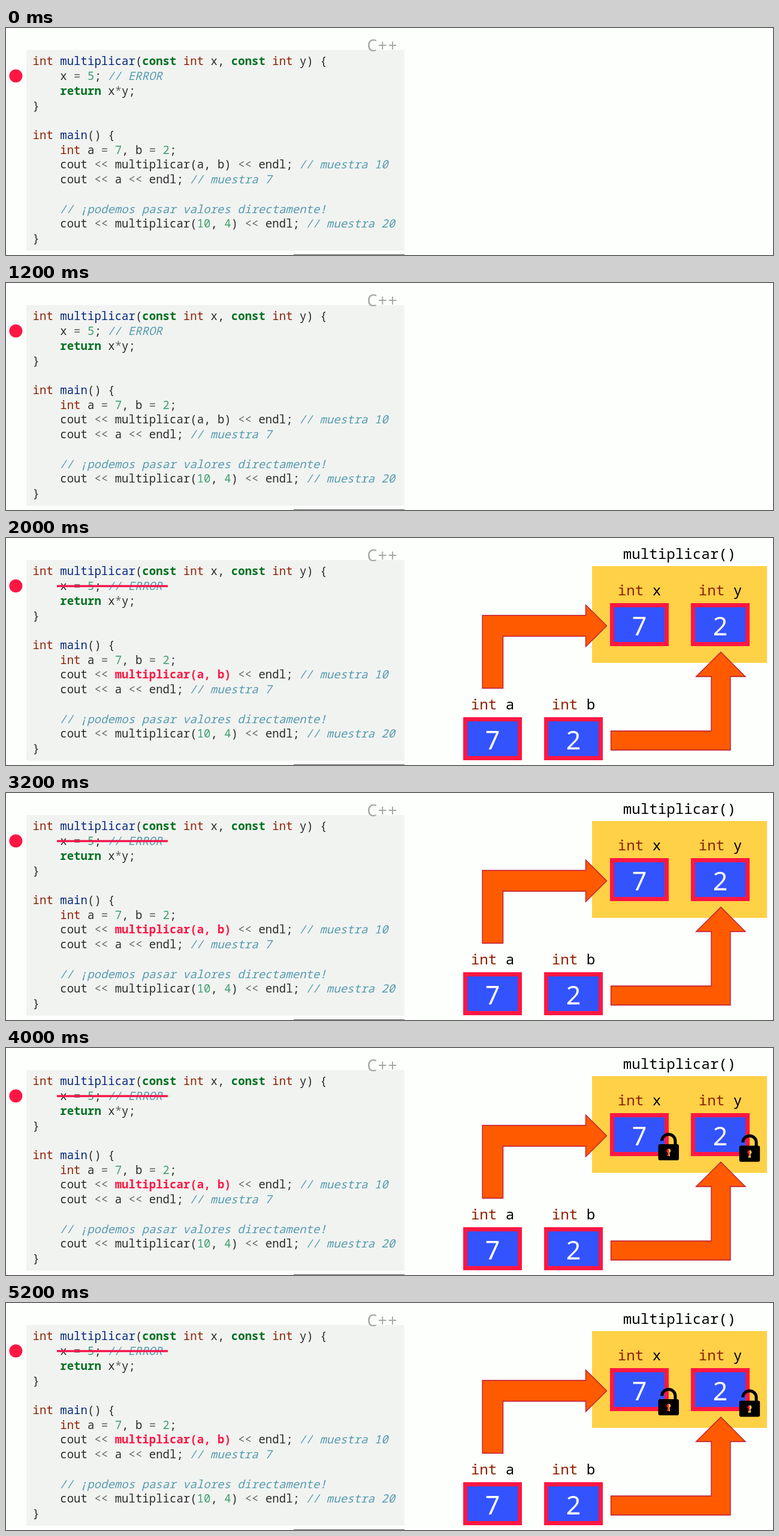
Recreate the animation shown at these times as an HTML page. Size 1280 by 380 pixels, loop 6000 ms.

```html
<!DOCTYPE html>
<html lang="es">
<head>
<meta charset="utf-8">
<title>Paso por valor constante</title>
<style>
  html, body { margin: 0; width: 100%; height: 100%; overflow: hidden; background: #fdfffd; }
  svg { display: block; width: 1280px; height: 380px; }
  text { white-space: pre; }
  .code { font: 19.04px "Noto Sans Mono", monospace; fill: #2b2b2b; }
  .type { fill: #902000; }
  .key { fill: #007020; font-weight: bold; }
  .func { fill: #06287e; }
  .num { fill: #40a070; }
  .op { fill: #666; }
  .note { fill: #569bb0; font-style: italic; }
  .hot { fill: #ff1744; font-weight: bold; }
  .label { font: 24.2px "Noto Sans Mono", monospace; text-anchor: middle; }
  .value { font: 43px "Noto Sans", sans-serif; text-anchor: middle; fill: #fff; }
  .lang { font: 26.5px "Noto Sans", sans-serif; letter-spacing: 1.5px; fill: #a6a6a6; }
  .cell { fill: #3353ff; stroke: #ff1744; stroke-width: 7; }
  .arrow { fill: #ff5a00; stroke: #bd1736; stroke-width: 1.3; }
</style>
</head>
<body>
<svg viewBox="0 0 1280 380">
  <defs>
    <g id="lock">
      <path d="M3.500 19H32Q35 19 35 22V43Q35 46 32 46H3.500Q.5 46 .5 43V22Q.5 19 3.500 19Z
               M17.700 26.500A3.400 3.400 0 0 0 16.200 33L15.400 39H20L19.200 33A3.400 3.400 0 0 0 17.700 26.500Z"
            fill-rule="evenodd"/>
      <path d="M6.500 13.500A11.200 11 0 0 1 28.900 13.500V20" fill="none" stroke="#000" stroke-width="5"/>
    </g>
  </defs>

  <rect x="34" y="36.700" width="630.700" height="336" fill="#f1f3f1"/>
  <text class="lang" x="602.500" y="38.500">C++</text>
  <path d="M480 379.500H665" stroke="#5a5a5a"/>
  <circle cx="16.400" cy="80.300" r="11" fill="#ff1744"/>
  <g id="code" class="code"></g>

  <g data-steps="12">
    <path d="M85 80.500H270" stroke="#f3174b" stroke-width="3.400"/>
    <rect x="978" y="47" width="292" height="162" fill="#ffd147"/>
    <text class="label" x="1124" y="35">multiplicar()</text>
    <g id="cells"></g>
    <path class="arrow" d="M795 129.500H967.500V112L1002.500 147L967.500 182V164.500H829.500V251.500H795Z"/>
    <path class="arrow" d="M1009.500 323H1177V232H1151.500L1193 191L1234 232H1209V355H1009.500Z"/>
  </g>
  <g data-steps="2">
    <use href="#lock" x="1088" y="142"/>
    <use href="#lock" x="1223.200" y="144.500"/>
  </g>
</svg>
<script>
const STEP = 2000, STEPS = 3;

const source = `int multiplicar(const int x, const int y) {
    x = 5; // ERROR
    return x*y;
}

int main() {
    int a = 7, b = 2;
    cout << multiplicar(a, b) << endl; // muestra 10
    cout << a << endl; // muestra 7

    // ¡podemos pasar valores directamente!
    cout << multiplicar(10, 4) << endl; // muestra 20
}`;

const rules = [
  ['note', '//.*'],
  ['call', 'multiplicar\\(a, b\\)'],
  ['key', '\\b(?:const|return)\\b'],
  ['type', '\\bint\\b'],
  ['func', '(?<=int )\\w+(?=\\()'],
  ['num', '\\b\\d+\\b'],
  ['op', '<<|=|\\*']
];
const tokens = new RegExp(rules.map(([name, re]) => `(?<${name}>${re})`).join('|'), 'g');
const escapeText = s => s.replace(/</g, '&lt;');

const attributes = { call: 'data-call', note: 'class="note" dx="-0.800"' };

function paint(line) {
  let html = '', last = 0;
  for (const m of line.matchAll(tokens)) {
    const [name] = Object.entries(m.groups).find(([, v]) => v !== undefined);
    const attrs = attributes[name] || `class="${name}"`;
    html += escapeText(line.slice(last, m.index)) + `<tspan ${attrs}>${escapeText(m[0])}</tspan>`;
    last = m.index + m[0].length;
  }
  return html + escapeText(line.slice(last));
}

document.getElementById('code').innerHTML = source.split('\n')
  .map((line, i) => `<text x="44.600" y="${62.4 + 24.72 * i}">${paint(line)}</text>`).join('');

const cells = [['x', 7, 1057, 145], ['y', 2, 1192, 145], ['a', 7, 812, 336], ['b', 2, 947, 336]];
document.getElementById('cells').innerHTML = cells.map(([name, value, x, y]) => `
  <text class="label" x="${x}" y="${y - 48.6}"><tspan class="type">int</tspan> ${name}</text>
  <rect class="cell" x="${x - 45.5}" y="${y - 32.5}" width="91" height="65"/>
  <text class="value" x="${x}" y="${y + 17.5}">${value}</text>`).join('');

const call = document.querySelector('[data-call]');
const layers = [...document.querySelectorAll('[data-steps]')];

function draw(now) {
  const step = Math.floor(now / STEP) % STEPS;
  for (const layer of layers)
    layer.style.visibility = layer.dataset.steps.includes(step) ? 'visible' : 'hidden';
  call.setAttribute('class', step > 0 ? 'hot' : '');
}

const start = performance.now();
function tick() {
  draw(performance.now() - start);
  requestAnimationFrame(tick);
}
tick();
</script>
</body>
</html>
```
